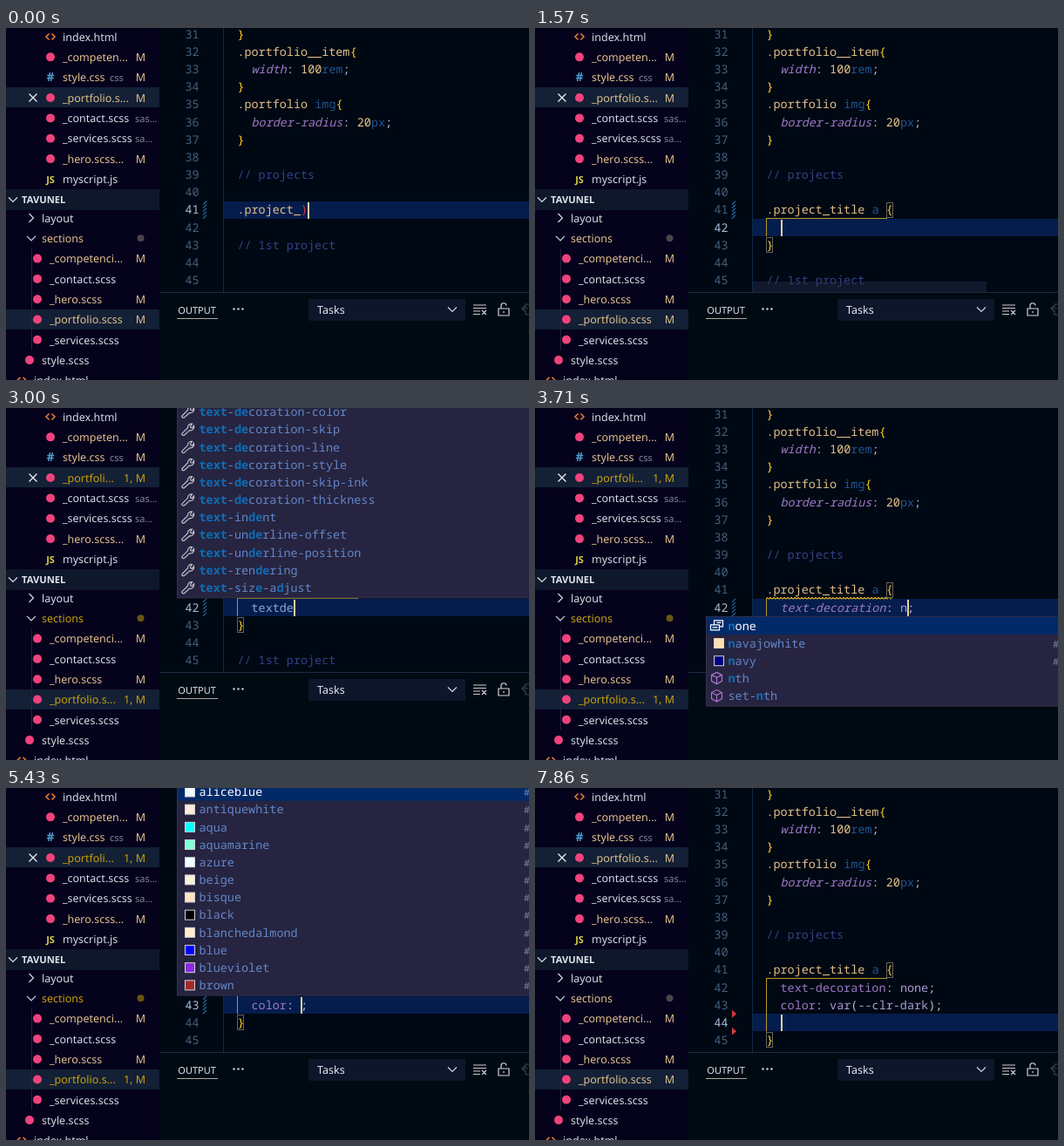
Recreate the animation shown at these times as an HTML page with a canvas. Size 600x404 px, loop 8 s.

```html
<!DOCTYPE html>
<html lang="en">
<head>
<meta charset="utf-8">
<title>Editing a stylesheet</title>
<style>
html, body { margin: 0; width: 100%; height: 100%; overflow: hidden; background: #000813; }
canvas { display: block; width: 600px; height: 404px; }
</style>
</head>
<body>
<canvas width="600" height="404"></canvas>
<script>
const ctx = document.querySelector("canvas").getContext("2d");
const LOOP = 8000, TICKS = 56;
const CODE_X = 265.4, CHAR = 8.08, ROW = 20.17, FIRST_LINE = 31;
const MONO = '13.45px "Noto Sans Mono", monospace';
const UI = '"Noto Sans", sans-serif';
const TAN = "#e2c08d", GOLD = "#c9a00c", PINK = "#f0437c", WHITE = "#d8dbe8";
const SELECTED_ROW = "#132036";

const tokenColors = {
  comment: "#304288", selector: "#e0c08a", brace: "#ffd21c", property: "#9a78c6",
  number: "#e6c58a", value: "#a99bd6", bare: "#8ba6d8", tag: "#1f5593", error: "#c8374a", plain: "#b9b8cf"
};
const tokens = /(?<comment>\/\/.*)|(?<selector>\.\w+)|(?<brace>[{}])|(?<property>[a-z-]+(?=:))|(?<number>\d+)|(?<value>--[\w-]+|var|(?<=: )[a-z]+)|(?<bare>(?<=^ +)[a-z]+$)|(?<tag>[a-z]+)|(?<error>(?<=_)\))|(?<plain>\S)/g;

const fixedLines = ["}", ".portfolio__item{", "  width: 100rem;", "}", ".portfolio img{",
  "  border-radius: 20px;", "}", "", "// projects", ""];

// Suggestions: name@icon, a wrench when no icon is given
const lists = {
  tags: "title@cube,time@cube,tt@cube,td@cube,th@cube,tr@cube",
  links: "a@cube,abbr@cube,address@cube,area@cube,article@cube,aside@cube,audio@cube",
  text: "text-decoration,text-decoration-color,text-decoration-skip,text-decoration-line,text-decoration-style,text-decoration-skip-ink,text-decoration-thickness,text-indent,text-underline-offset,text-underline-position,text-rendering,text-size-adjust",
  lines: "none@value,blink@value,dashed@value,dotted@value,overline@value,underline@value",
  none: "none@value,navajowhite@swatch,navy@swatch,nth@cube,set-nth@cube",
  props: "counter-reset: ;,color,content,contain,column-gap,column-count,counter-increment,counter-reset,content-visibility,color-scheme,column-rule,column-width",
  colors: "aliceblue,antiquewhite,aqua,aquamarine,azure,beige,bisque,black,blanchedalmond,blue,blueviolet,brown".replace(/\w+/g, "$&@swatch"),
  var: "var()@cube,violet@swatch,blueviolet@swatch,mediumvioletred@swatch,palevioletred@swatch,navajowhite@swatch",
  vars: "--clr-dark@variable,--fs-project@variable"
};

// [tick, text with | as the cursor, suggestion list]
const HEAD = ".project_title a {\n  ";
const DECORATION = HEAD + "text-decoration: none;\n  ";
const steps = [
  [0, ".project_)|"], [1, ".project_|"], [2, ".project_t|", "tags"], [3, ".project_ti|", "tags"],
  [4, ".project_tit|", "tags"], [5, ".project_titl|", "tags"], [6, ".project_title|", "tags"],
  [7, ".project_title |"], [8, ".project_title a|", "links"], [9, ".project_title a {|}"],
  [10, HEAD + "|"], [13, HEAD + "t|", "text"], [14, HEAD + "te|", "text"],
  [15, HEAD + "tex|", "text"], [17, HEAD + "text|", "text"], [19, HEAD + "textd|", "text"],
  [20, HEAD + "textde|", "text"], [22, HEAD + "textdec|", "text"],
  [24, HEAD + "text-decoration: |;", "lines"], [26, HEAD + "text-decoration: n|;", "none"],
  [28, HEAD + "text-decoration: none|;"], [29, HEAD + "text-decoration: none;|"],
  [31, DECORATION + "|"], [33, DECORATION + "c|", "props"], [34, DECORATION + "co|", "props"],
  [36, DECORATION + "colo|", "props"], [37, DECORATION + "color|", "props"],
  [38, DECORATION + "color: |;", "colors"], [42, DECORATION + "color: v|;", "var"],
  [43, DECORATION + "color: va|;", "var"], [44, DECORATION + "color: var(|);", "vars"],
  [49, DECORATION + "color: var(--clr-dark|);"], [50, DECORATION + "color: var(--clr-dark);|"],
  [52, DECORATION + "color: var(--clr-dark);\n  |"]
];

const icons = {
  wrench: "M-6.5 4.5L0-2A4.3 4.3 0 0 1 5-6.5L3-3.5 3.5-2 5.5-2 7-4.5A4.3 4.3 0 0 1 2 1L-4 6.5Q-5.5 7-6.5 6-7 5-6.5 4.5Z",
  cube: "M0-7L6-4V3L0 6.5L-6 3V-4ZM-6-4L0-1L6-4M0-1V6.5",
  value: "M-3-1V-6H7V1H3M-7-1H3V5H-7ZM0-3.5H5M-5 2H1",
  variable: "M-4-5H-7V5H-4M4-5H7V5H4M-4 0L1-3 4-1.5V1L-1 4-4 2.5ZM-4 0L-1 1 4-1.5",
  down: "M-5-2.5L0 2.5 5-2.5", right: "M-2.5-5L2.5 0-2.5 5",
  close: "M-4.5-4.5L4.5 4.5M4.5-4.5L-4.5 4.5",
  html: "M-1.5-3.5L-5 0-1.5 3.5M1.5-3.5L5 0 1.5 3.5",
  clear: "M-7-5H8M-7-1.5H8M-7 2H1M-7 5.5H1M3 1L8 6M8 1L3 6",
  lock: "M-6-1H6V7H-6ZM-3-1V-4A3 3 0 0 1 3-4.5M0 2V4",
  window: "M8-6H-1V-2M-5-1H2M-2-4L-5-1-2 2M-1 1V6H8"
};

const lineY = n => 7 + (n - FIRST_LINE) * ROW;
const colX = col => CODE_X + col * CHAR;

function rect(x, y, w, h, color) {
  ctx.fillStyle = color;
  ctx.fillRect(x, y, w, h);
}
function text(str, x, y, color, font = "12.5px " + UI, align = "left") {
  ctx.font = font;
  ctx.textAlign = align;
  ctx.fillStyle = color;
  ctx.fillText(str, x, y + 4.7);
}
function path(d, x, y, color, width = 1.2) {
  ctx.save();
  ctx.translate(x, y);
  ctx.strokeStyle = color;
  ctx.lineWidth = width;
  ctx.stroke(new Path2D(d));
  ctx.restore();
}
function dot(x, y, r, color) {
  ctx.fillStyle = color;
  ctx.beginPath();
  ctx.arc(x, y, r, 0, 7);
  ctx.fill();
}
function box(col, line) {
  ctx.strokeStyle = "#66645f";
  ctx.lineWidth = 1;
  ctx.strokeRect(Math.round(colX(col)) + 0.5, Math.round(lineY(line)) - 8.5, 7, 17);
}

function codeLine(str, n, italic) {
  for (const match of str.matchAll(tokens)) {
    const kind = Object.keys(match.groups).find(key => match.groups[key]);
    const slant = italic && kind === "property" ? "italic " : "";
    text(match[0], colX(match.index), lineY(n), tokenColors[kind], slant + MONO);
  }
}

function subsequence(word, query) {
  const hits = [];
  let from = 0;
  for (const letter of query) {
    const i = word.indexOf(letter, from);
    if (i < 0) return null;
    hits.push(i);
    from = i + 1;
  }
  return hits;
}
// Also accepts a query whose last two letters are swapped
const fuzzy = (word, query) =>
  subsequence(word, query) || subsequence(word, query.replace(/(.)(.)$/, "$2$1"));

function popup(list, query, line) {
  const rows = lists[list].split(",").map(entry => entry.split("@"))
    .map(([word, icon = "wrench"]) => ({ word, icon, hits: fuzzy(word, query) }))
    .filter(row => row.hits);
  if (!rows.length) return;
  const height = rows.length * ROW + 1;
  const top = rows.length > 7 ? lineY(line) - 11.5 - height : lineY(line) + 11;
  rect(196, top - 1, 404, height + 2, "#33334f");
  rect(197, top, 403, height, "#262440");
  rows.forEach(({ word, icon, hits }, i) => {
    const y = top + 10 + i * ROW, selected = i === 0;
    if (selected) rect(197, y - 10, 403, ROW, "#022a69");
    if (icon === "swatch") {
      rect(205, y - 6, 12, 12, "#d0d0d8");
      rect(206, y - 5, 10, 10, word);
      text("#", 594, y, "#8087a0", "11px " + UI);
    } else {
      path(icons[icon], 208.5, y, icon === "cube" ? "#a875cf" : selected ? "#fff" : icon === "variable" ? "#7d9fd0" : "#c0c0ca");
    }
    [...word].forEach((letter, col) => {
      const hit = hits.includes(col);
      const color = hit ? "#0e6db6" : selected ? "#fff" : "#6386c8";
      text(letter, 221.5 + col * CHAR, y, color, (hit ? "bold " : "") + MONO);
    });
    if (word.endsWith(";")) text("Emmet Abbreviation", 518, y, "#b9c0d8", "500 12px " + UI);
  });
}

function editor(tick) {
  const [, source, list] = steps.findLast(step => step[0] <= tick);
  const before = source.split("|")[0].split("\n");
  const line = 40 + before.length, col = before.at(-1).length;
  const block = source.replace("|", "").split("\n");
  const inBlock = block.length > 1;
  const endLine = 41 + block.length;
  const doc = [...fixedLines, ...block, ...(inBlock ? ["}"] : []), "", "// 1st project", "", ""].slice(0, 15);

  rect(176, 0, 424, 303, "#000813");
  rect(250, Math.round(lineY(line)) - 10, 350, 20, "#051d4d");
  rect(249, 0, 1, 303, "#0c2945");
  doc.forEach((str, i) => {
    const n = FIRST_LINE + i;
    text(n, 221.5, lineY(n), n === line ? "#a3bdd8" : "#40607f", MONO, "right");
    codeLine(str, n, n < 41 || tick < 28);
  });

  if (inBlock) {
    const y = Math.round(lineY(41)) + 9;
    rect(266, y, 138, 1, "#b99a20");
    rect(265, y, 1, lineY(endLine) - 10 - y, "#b99a20");
    if (tick >= 24 && tick < 29) path("M0 0" + "l2 2.5l2-2.5".repeat(36), 266, y - 1, "#c9a51c", 1);
    if (source.includes("(|)")) { box(col - 1, line); box(col, line); }
    else { box(17, 41); if (endLine < 46) box(0, endLine); }
  }
  rect(Math.round(colX(col)), Math.round(lineY(line)) - 9, 2, 19, "#e6cfa0");

  if (tick < 54) {
    const y = lineY(tick < 13 ? 41 : line) - 10;
    for (let i = 0; i < 5; i++) path("M0 4L4 0", 226, y + i * 4, "#1f6a9c", 1.3);
  } else {
    for (const n of [43.5, 44.5]) {
      ctx.fillStyle = "#d8383e";
      ctx.fill(new Path2D(`M226 ${lineY(n) - 4.5}l5 4.5l-5 4.5z`));
    }
  }
  if ((tick >= 10 && tick < 14) || (tick >= 31 && tick < 37)) rect(250, 291, 268, 12, "rgba(36,46,76,.45)");

  panel();
  if (list) popup(list, before.at(-1).match(/[a-z]*$/)[0], line);
}

function panel() {
  rect(176, 303, 424, 101, "#000a13");
  rect(176, 303, 424, 1, "#1c2b42");
  text("OUTPUT", 197.3, 323, "#dfe3ec", "11px " + UI);
  rect(196, 333, 47, 1, "#b0a9a0");
  for (const x of [261.5, 266.5, 271.5]) dot(x, 322.5, 1.2, "#d0d3dc");
  rect(347, 311, 180, 25, "#0d162b");
  text("Tasks", 357, 323.5, "#e6e8f0");
  path(icons.down, 512, 323, "#d0d3dc");
  path(icons.clear, 543, 323, "#c9ccd5");
  path(icons.lock, 571, 323, "#d0d3dc");
  path(icons.window, 597, 323, "#3b4250");
}

function fileIcon(name, x, y) {
  if (name.endsWith("html")) path(icons.html, x, y, "#e37933", 1.6);
  else if (name.endsWith("js")) text("JS", x, y, "#d7cf45", "bold 11px " + UI, "center");
  else if (name.endsWith(".css")) text("#", x, y, "#4f9fd0", "bold 14px " + UI, "center");
  else dot(x, y, 5, PINK);
}
function fileRow(label, x, y, status, color = status ? TAN : WHITE) {
  fileIcon(label, x - 14, y);
  text(label, x, y, color);
  if (status) text(status, 160, y, color, "12.5px " + UI, "right");
}

function sidebar(tick) {
  const failing = (tick >= 4 && tick < 9) || (tick >= 14 && tick < 30) || (tick >= 36 && tick < 42);
  const treeFailing = failing && tick > 9;
  const openY = i => 10 + 23.35 * i, treeY = i => 218 + 23.3 * i;
  rect(0, 0, 176, 404, "#05021c");
  rect(0, 68, 176, 23, SELECTED_ROW);
  rect(0, 323, 176, 23, SELECTED_ROW);

  fileRow("index.html", 65, openY(0));
  fileRow("_competen...", 65, openY(1), "M");
  fileRow("style.css", 65, openY(2), "M");
  text("css", 119, openY(2), "#85869a", "11px " + UI);
  path(icons.close, 31, openY(3), "#e6e8f0", 1.4);
  if (failing) fileRow("_portfoli...", 65, openY(3), "1, M", GOLD);
  else fileRow("_portfolio.s...", 65, openY(3), "M");
  fileRow("_contact.scss", 65, openY(4));
  text("sas...", 148, openY(4), "#85869a", "11px " + UI);
  fileRow("_services.scss", 65, openY(5));
  text("sa...", 148, openY(5), "#85869a", "11px " + UI);
  fileRow("_hero.scss...", 65, openY(6), "M");
  fileRow("myscript.js", 65, openY(7));

  rect(0, 185, 176, 24, "#0f182b");
  path(icons.down, 8, 197, WHITE);
  text("TAVUNEL", 18, 196.5, "#e0e2ec", "bold 11.2px " + UI);

  path(icons.right, 29, treeY(0), WHITE);
  text("layout", 41, treeY(0), WHITE);
  path(icons.down, 29, treeY(1), WHITE);
  text("sections", 41, treeY(1), treeFailing ? GOLD : TAN);
  dot(154.5, treeY(1), 4, treeFailing ? "#6a5513" : "#4a4347");
  rect(29, treeY(2) - 11, 1, 116, "#24233f");
  fileRow("_competenci...", 50, treeY(2), "M");
  fileRow("_contact.scss", 50, treeY(3));
  fileRow("_hero.scss", 50, treeY(4), "M");
  if (treeFailing) fileRow("_portfolio.s...", 50, treeY(5), "1, M", GOLD);
  else fileRow("_portfolio.scss", 50, treeY(5), "M");
  fileRow("_services.scss", 50, treeY(6));
  fileRow("style.scss", 41, treeY(7));
  fileRow("index.html", 32, treeY(8));
}

function draw() {
  const time = performance.now() % LOOP;
  const tick = Math.min(TICKS - 1, Math.floor((time + 5) * TICKS / LOOP));
  ctx.textRendering = "geometricPrecision";
  editor(tick);
  sidebar(tick);
  requestAnimationFrame(draw);
}
draw();
</script>
</body>
</html>
```
